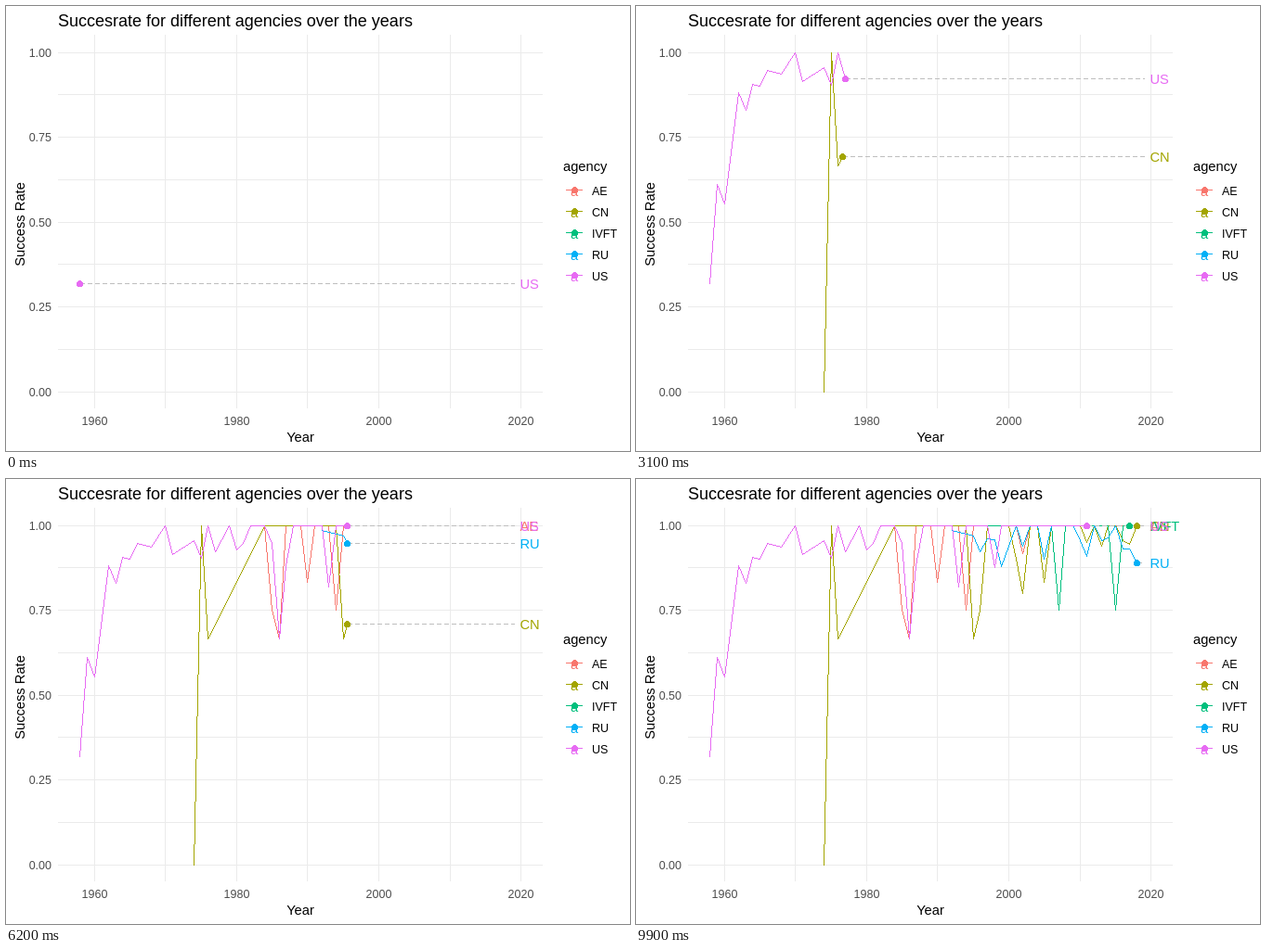
Write an HTML page that moves like this. It is 672 px wide and 480 px high and loops after 10 s.

```html
<!DOCTYPE html>
<html lang="en">
<head>
<meta charset="utf-8">
<title>Success rate by agency</title>
<style>
  html, body { margin: 0; width: 100%; height: 100%; overflow: hidden; background: #fff; }
  svg { display: block; font-family: "Liberation Sans", Arial, sans-serif; }
  path, line, circle { shape-rendering: crispEdges; fill: none; }
  .grid { stroke: #ebebeb; }
  .tick { font-size: 12.5px; fill: #4d4d4d; }
  .key { font-size: 12.5px; }
  .name { font-size: 14.7px; }
  .title { font-size: 18px; }
</style>
</head>
<body>
<svg id="chart" width="672" height="480" viewBox="0 0 672 480"></svg>
<script>
const FRAMES = 100, STEP = 100, FIRST = 1958, LAST = 2018;
const svg = document.getElementById('chart');

// Key years only: straight lines join them up to the steady year,
// after which every unlisted year has a rate of 1.
const agencies = [
  { name: 'AE', color: '#F8766D', steady: 1984, last: 2018,
    keys: { 1985: 3/4, 1986: 2/3, 1990: 5/6, 1994: 3/4, 2002: 11/12 } },
  { name: 'CN', color: '#A3A500', steady: 1984, last: 2018,
    keys: { 1974: 0, 1975: 1, 1976: 2/3, 1995: 2/3, 1996: 3/4, 2001: .9, 2002: .8,
            2005: 5/6, 2011: .95, 2013: .94, 2016: .955, 2017: .945 } },
  { name: 'IVFT', color: '#00BF7D', steady: 1997, last: 2017,
    keys: { 2007: 3/4, 2015: 3/4 } },
  { name: 'RU', color: '#00B0F6', steady: 2001, last: 2018,
    keys: { 1992: .985, 1995: .97, 1996: .923, 1997: .96, 1998: .957, 1999: .878,
            2002: .94, 2005: .9, 2010: .955, 2011: .91, 2013: .955, 2014: .965,
            2016: .93, 2017: .93, 2018: .89 } },
  { name: 'US', color: '#E76BF3', steady: 1982, last: 2011,
    keys: { 1958: .32, 1959: .612, 1960: .553, 1962: .882, 1963: .829, 1964: .905, 1965: .9,
            1966: .947, 1968: .937, 1970: 1, 1971: .914, 1974: .956, 1975: .903, 1976: 1,
            1977: .923, 1979: 1, 1980: .929, 1981: .947,
            1985: .947, 1986: 2/3, 1987: .882, 1993: .82, 1998: 7/8 } }
];

const px = year => Math.floor(95.1 + (year - 1960) * 7.66) + .5;
const py = rate => Math.floor(416.2 - rate * 366) + .5;

function set(el, attrs) {
  for (const k in attrs) el.setAttribute(k, attrs[k]);
}
function add(tag, attrs, text) {
  const el = document.createElementNS('http://www.w3.org/2000/svg', tag);
  set(el, attrs);
  if (text) el.textContent = text;
  return svg.appendChild(el);
}

// Nearest animation step for a year, with halves going to the even step.
function stepOf(year) {
  const s = (year - FIRST) * (FRAMES - 1) / (LAST - FIRST), r = Math.round(s);
  return r - s === .5 && r % 2 ? r - 1 : r;
}

function points({ steady, last, keys }) {
  const list = [];
  for (let year = FIRST; year <= last; year++)
    if (year in keys || year >= steady)
      list.push({ year, rate: keys[year] ?? 1, step: stepOf(year) });
  return list;
}

// A line without smoothing: one pixel per step along its longer side.
function pixelLine(a, b) {
  const x = px(a.year), y = py(a.rate), dx = px(b.year) - x, dy = py(b.rate) - y;
  const n = Math.max(Math.abs(dx), Math.abs(dy));
  let d = '';
  for (let i = 0; i < n; i++)
    d += `M${x - .5 + Math.round(dx * i / n)} ${y + Math.round(dy * i / n)}h1`;
  return d;
}

function drawAxes() {
  for (let i = 0; i <= 8; i++) {
    const y = py(i / 8);
    add('path', { class: 'grid', d: `M56 ${y}H578` });
    if (i % 2 === 0)
      add('text', { class: 'tick', x: 49, y: y + 4.5, 'text-anchor': 'end' }, (i / 8).toFixed(2));
  }
  for (let year = 1960; year <= 2020; year += 10) {
    const x = px(year);
    add('path', { class: 'grid', d: `M${x} 31V434` });
    if (year % 20 === 0)
      add('text', { class: 'tick', x, y: 452, 'text-anchor': 'middle' }, year);
  }
  add('text', { class: 'title', x: 56, y: 22 }, 'Succesrate for different agencies over the years');
  add('text', { class: 'name', x: 317, y: 470, 'text-anchor': 'middle' }, 'Year');
  add('text', { class: 'name', transform: 'translate(20 235.5) rotate(-90)', 'text-anchor': 'middle' }, 'Success Rate');
}

function drawLegend() {
  add('text', { class: 'name', x: 600, y: 178 }, 'agency');
  agencies.forEach(({ name, color }, i) => {
    const y = 198.5 + i * 23;
    add('path', { d: `M603 ${y}H621`, stroke: color });
    add('circle', { cx: 612.5, cy: y, r: 3.5, style: `fill:${color}` });
    add('text', { class: 'name', x: 612, y: y + 6.5, fill: color, 'text-anchor': 'middle' }, 'a');
    add('text', { class: 'key', x: 631, y: y + 5.5 }, name);
  });
}

drawAxes();
drawLegend();
const layer = (tag, attrs) => agencies.forEach(a => a[tag] = add(tag, attrs(a), tag === 'text' && a.name));
layer('path', a => ({ stroke: a.color }));
layer('line', () => ({ stroke: '#bebebe', 'stroke-dasharray': '5 3', x2: px(2019) }));
layer('circle', a => ({ r: 3.5, style: `fill:${a.color}` }));
layer('text', a => ({ class: 'name', x: 553.5, fill: a.color }));
agencies.forEach(a => a.points = points(a));

function headAt(list, frame) {
  const i = list.findIndex(p => p.step > frame);
  if (i < 0) return list[list.length - 1];
  const a = list[i - 1], b = list[i], k = (frame - a.step) / (b.step - a.step);
  return { year: a.year + (b.year - a.year) * k, rate: a.rate + (b.rate - a.rate) * k };
}

function draw(frame) {
  for (const a of agencies) {
    const shown = a.points[0].step <= frame;
    for (const tag of ['path', 'line', 'circle', 'text'])
      a[tag].style.display = shown ? '' : 'none';
    if (!shown) continue;
    const head = headAt(a.points, frame), x = px(head.year), y = py(head.rate);
    const trail = [...a.points.filter(p => p.step <= frame), head];
    set(a.path, { d: trail.slice(1).map((p, i) => pixelLine(trail[i], p)).join('') });
    set(a.line, { x1: x, y1: y, y2: y });
    set(a.circle, { cx: x, cy: y });
    set(a.text, { y: y + 5.5 });
  }
}

let drawn = -1;
function tick() {
  const frame = Math.floor(performance.now() / STEP) % FRAMES;
  if (frame !== drawn) draw(drawn = frame);
  requestAnimationFrame(tick);
}
tick();
</script>
</body>
</html>
```
